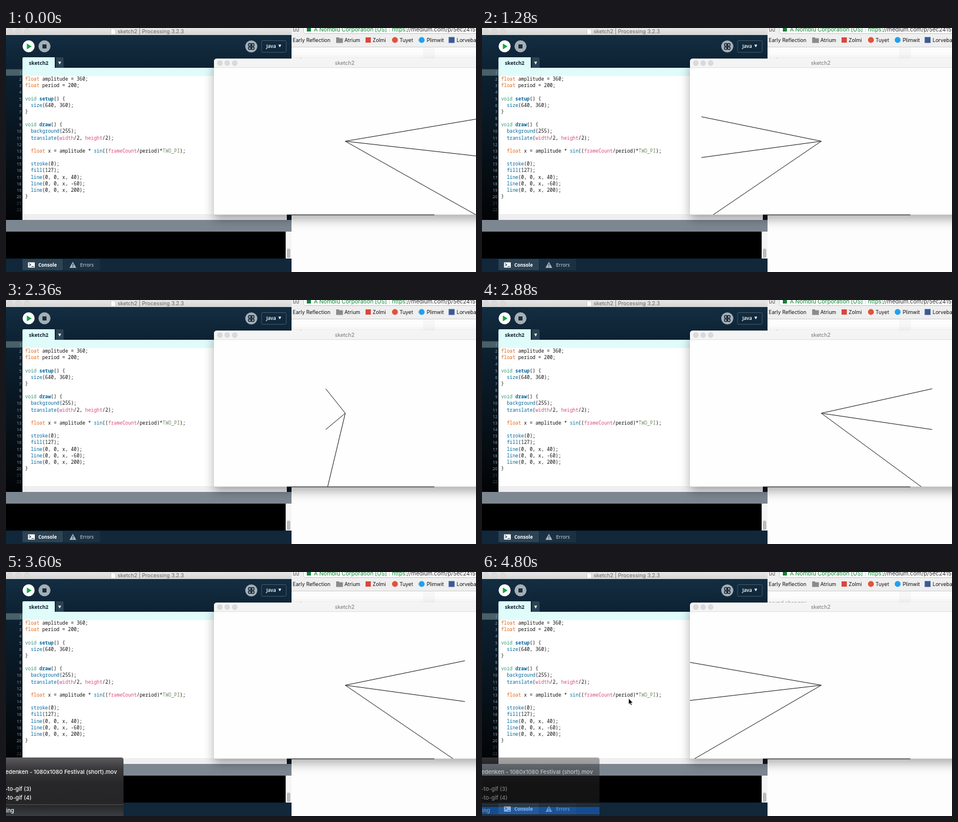
An HTML page for the animation above (4840 ms loop, 800x417 px).

```html
<!DOCTYPE html>
<html lang="en">
<head>
<meta charset="utf-8">
<title>sketch2</title>
<style>
  html, body { margin: 0; width: 100%; height: 100%; overflow: hidden; background: #fff; }
  svg { display: block; width: 100vw; height: 100vh; }
  text { font: 9px Inter, sans-serif; white-space: pre; }
  .ide { font: 600 8.3px "Open Sans", sans-serif; fill: #fff; }
  .num { font: 7.4px "Open Sans", sans-serif; text-anchor: end; fill: #93a4af; }
  .code text { font: 500 8.13px "Noto Sans Mono", monospace; fill: #111; }
  .type { fill: #e2661a; }
  .void { fill: #33997e; }
  .func, .main { fill: #069; }
  .main { font-weight: 700; }
  .sys { fill: #d94a7a; }
  .const { fill: #718a62; }
  .address text { font-size: 9.6px; }
  .bookmarks text { font-size: 8.7px; fill: #111; }
  .caption { fill: #777; }
  .lights { fill: #dadada; stroke: #c8c8c8; stroke-width: .6; }
  .menu text { font-size: 9.45px; font-weight: 500; fill: #fff; }
  #rays { stroke: #1c1c1c; }
</style>
</head>
<body>
<svg viewBox="0 0 800 417" preserveAspectRatio="none">
  <defs>
    <linearGradient id="bar" x2="0" y2="1"><stop stop-color="#e6e6e6"/><stop offset="1" stop-color="#d5d5d5"/></linearGradient>
    <linearGradient id="head" x2="0" y2="1"><stop stop-color="#132d41"/><stop offset="1" stop-color="#0d2233"/></linearGradient>
    <linearGradient id="gutter" x2="0" y2="1"><stop stop-color="#0d2233"/><stop offset="1" stop-color="#020406"/></linearGradient>
    <linearGradient id="glass" x2="0" y2="1"><stop stop-color="#5c5c5e"/><stop offset=".2" stop-color="#38383a"/><stop offset=".45" stop-color="#272729"/><stop offset=".8" stop-color="#252527"/><stop offset="1" stop-color="#3a3e43"/></linearGradient>
    <filter id="shadow" x="-20%" y="-20%" width="140%" height="150%"><feDropShadow dx="0" dy="8" stdDeviation="9" flood-opacity=".32"/></filter>
    <clipPath id="canvas"><path d="M354 68h446v251H354z"/></clipPath>
  </defs>

  <!-- browser -->
  <path fill="#fdfdfd" d="M486 0h314v417H486z"/>
  <path fill="#f7f7f7" d="M710 33h20v20h-20z"/>
  <path fill="#efefef" d="M486 0h314v32H486z"/>
  <path stroke="#d0d0d0" d="M486 32.500h314"/>
  <path fill="#fff" stroke="#c8c8c8" d="M506.500-5V6.500q0 3 3 3H805V-5z"/>
  <path fill="none" stroke="#777" d="M489.500 0v5.500h3V2h2.500v3.500h3V0"/>
  <g class="address">
    <path fill="#188038" d="M512 0h7v6h-7z"/>
    <text x="524" y="5.500" fill="#188038">A Nomblu Corporation [US]</text>
    <path stroke="#ccc" d="M652.500 0v7"/>
    <text x="657" y="5.500" fill="#333"><tspan fill="#188038">https</tspan>://medium.com/p/5ec2415</text>
  </g>
  <g class="bookmarks">
    <text x="488" y="23.500">Early Reflection</text>
    <path fill="#8a8a8a" d="M562 16h4.500l1 1.500h6v8H562z"/>
    <text x="576" y="23.500">Atrium</text>
    <path fill="#d9473c" d="M612 16h9v9h-9z"/>
    <text x="624" y="23.500">Zolmi</text>
    <circle cx="662" cy="20.500" r="5" fill="#e0523f"/>
    <text x="670" y="23.500">Tuyet</text>
    <circle cx="707.500" cy="20.500" r="5" fill="#1da1f2"/>
    <text x="716" y="23.500">Plimwit</text>
    <path fill="#3b5998" d="M753.500 15.500h10v10h-10z"/>
    <text x="767" y="23.500">Lorvebam</text>
  </g>
  <circle cx="502" cy="51.500" r=".6" fill="#999"/>
  <text id="status" x="488" y="56" fill="#999">saved changes</text>

  <!-- editor -->
  <path fill="#0d2233" d="M0 0h486v417H0z"/>
  <path fill="url(#bar)" d="M0 0h486v12H0z"/>
  <g class="lights"><circle cx="6.500" cy="5.500" r="4.300"/><circle cx="21" cy="5.500" r="4.300"/><circle cx="35.500" cy="5.500" r="4.300"/></g>
  <path fill="#fafafa" stroke="#bbb" stroke-width=".7" d="M178.500 1h5l3 3v7h-8z"/>
  <text x="190" y="9" fill="#666">sketch2 | Processing 3.2.3</text>
  <path fill="url(#head)" d="M0 12h486V70H0z"/>
  <circle cx="38.500" cy="31.300" r="10.200" fill="#fff"/>
  <path fill="#18a347" d="M35.500 26.500l8 5-8 5z"/>
  <circle cx="65.500" cy="31.300" r="10.200" fill="#a5afb6"/>
  <path fill="#1b3040" d="M62 28h7v7h-7z"/>
  <circle cx="417.500" cy="31.500" r="10.300" fill="#a5afb6"/>
  <g fill="none" stroke="#14293a" stroke-width="1.400">
    <circle cx="414.800" cy="28.700" r="2.200"/><circle cx="420.200" cy="28.700" r="2.200"/>
    <circle cx="414.800" cy="34.500" r="2.200"/><circle cx="420.200" cy="34.500" r="2.200"/><path d="M417.500 26v11"/>
  </g>
  <rect x="435" y="21.500" width="42" height="20" rx="2" fill="none" stroke="#40576a"/>
  <text class="ide" x="443" y="34">Java</text>
  <path fill="#fff" d="M463.500 28.500h5l-2.500 4.500z"/>
  <path fill="url(#gutter)" d="M0 70h28v258H0z"/>
  <path fill="#4a6069" d="M0 70.500h28v11H0z"/>
  <path fill="#fff" d="M28 70h458v248H28z"/>
  <path fill="#e0fcfa" d="M28 52q0-2 2-2h53v18h403v14H28z"/>
  <text class="ide" x="39" y="63" style="fill:#0d2233;font-weight:700;font-size:8.600px">sketch2</text>
  <path fill="#2b4354" d="M85 50h11q2 0 2 2v16H85z"/>
  <path fill="#fff" d="M88.800 57.500h5l-2.500 5z"/>
  <g id="numbers"></g>
  <g id="code" class="code"></g>
  <path fill="#efefef" d="M28 318h450v10H28z"/>
  <path fill="#0b1722" d="M478 318h8v10h-8z"/>
  <path fill="#7d8791" d="M0 328h486v20H0z"/>
  <path fill="#000" d="M0 348h476v46H0z"/>
  <path fill="#f5f5f5" d="M476 348h10v46h-10z"/>
  <rect x="478" y="377" width="6" height="16" rx="3" fill="#bcbcbc"/>
  <path fill="#11273a" d="M0 394h486v23H0z"/>
  <path fill="#2c4354" d="M28 395h69v19H28z"/>
  <path fill="#1a3143" d="M98 395h62v19H98z"/>
  <path fill="#fff" d="M37.500 400.500h11.500v9H37.500z"/>
  <path fill="none" stroke="#2c4354" stroke-width="1.200" d="M39.500 402.500l2.500 2-2.500 2M43.500 407.500h4"/>
  <text class="ide" x="55" y="408" style="font-size:8px;font-weight:700">Console</text>
  <path fill="#aab5bd" d="M113.800 399.500l5.800 10.500H108z"/>
  <path stroke="#1a3143" stroke-width="1.200" d="M113.800 402.800v3.700m0 1v1.300"/>
  <text class="ide" x="126" y="408" style="font-size:8px;fill:#aab5bd">Errors</text>

  <!-- sketch window -->
  <path filter="url(#shadow)" fill="#fefefe" d="M354 319V57.500q0-5 5-5h461V319z"/>
  <path fill="#f4f4f4" d="M354 68V57.500q0-5 5-5h441V68z"/>
  <path stroke="#d6d6d6" stroke-width=".7" d="M354 67.700h446"/>
  <g class="lights"><circle cx="364" cy="60" r="4.200"/><circle cx="376.500" cy="60" r="4.200"/><circle cx="389.300" cy="60" r="4.200"/></g>
  <text class="caption" x="576.500" y="63.200" text-anchor="middle">sketch2</text>
  <path stroke="#c4c4c4" stroke-width=".7" d="M354 319.200h446"/>
  <path stroke="#1c1c1c" d="M478 319.300h251"/>
  <g clip-path="url(#canvas)"><path id="rays" fill="none"/></g>

  <!-- pop-up menu -->
  <g id="menu" class="menu">
    <path fill="url(#glass)" d="M0 317h196q4 0 4 4v96H0z"/>
    <path stroke="#5c5c5d" stroke-width=".8" d="M0 397.500h200"/>
    <path id="pick" fill="#1a72e6" d="M0 401.500h200V414H0z"/>
    <text x="-1" y="344.700">edenken - 1080x1080 Festival (short).mov</text>
    <text x="-1.500" y="373.500">-to-gif (3)</text>
    <text x="-1.500" y="388.500">-to-gif (4)</text>
    <text x="0" y="411">ing</text>
  </g>
  <path id="pointer" fill="#000" stroke="#fff" stroke-width=".8" d="M249.500 216v10.500l2.400-2.200 1.700 3.800 1.800-.8-1.600-3.600h3.300z"/>
</svg>
<script>
const $ = id => document.getElementById(id);

const program = `
float amplitude = 360;
float period = 200;

void setup() {
  size(640, 360);
}

void draw() {
  background(255);
  translate(width/2, height/2);

  float x = amplitude * sin((frameCount/period)*TWO_PI);

  stroke(0);
  fill(127);
  line(0, 0, x, 40);
  line(0, 0, x, -60);
  line(0, 0, x, 200);
}`.split("\n");

const words = {
  type: "float", void: "void", main: "setup|draw",
  func: "size|background|translate|sin|stroke|fill|line",
  sys: "width|height|frameCount", const: "TWO_PI"
};
const lineY = i => 79 + i * 11.16;
const paint = src => src.replace(/\w+/g, word => {
  const kind = Object.keys(words).find(k => words[k].split("|").includes(word));
  return kind ? `<tspan class="${kind}">${word}</tspan>` : word;
});

$("code").innerHTML = program.map((src, i) => {
  const body = src.trimStart();
  const x = 32.4 + (src.length - body.length) * 4.88;
  return `<text x="${x}" y="${lineY(i)}">${paint(body)}</text>`;
}).join("");

$("numbers").innerHTML = Array.from({ length: 22 }, (_, i) =>
  `<text class="num" x="26.500" y="${lineY(i)}"${i > 19 ? ' opacity=".45"' : ""}>${i + 1}</text>`
).join("");

const LOOP = 4840, STEP = 40;
const SCALE = 251 / 360, CX = 577.5, CY = 193.5;

const knots = [[0, 101], [1280, 234.4], [1880, 300.3], [2880, 408.8],
               [3600, 485.8], [4360, 561.8], [4800, 612.5], [LOOP, 617]];

function phase(t) {
  const i = knots.findIndex(k => k[0] > t);
  const [t0, a] = knots[i - 1], [t1, b] = knots[i];
  return a + (b - a) * (t - t0) / (t1 - t0);
}

const show = (id, on) => { $(id).style.display = on ? "" : "none"; };

function draw(now) {
  const t = Math.floor(now % LOOP / STEP) * STEP;
  const x = CX + 360 * SCALE * Math.sin(phase(t) * Math.PI / 180);
  $("rays").setAttribute("d", [40, -60, 200]
    .map(y => `M${CX} ${CY}L${x.toFixed(2)} ${(CY + y * SCALE).toFixed(2)}`).join(""));

  show("menu", t >= 3200);
  show("pick", t >= 4080);
  show("status", t >= 4000);
  show("pointer", t >= 4800);
  $("menu").setAttribute("opacity", Math.min(1, (4900 - t) / 200));
}

function tick() {
  draw(performance.now());
  requestAnimationFrame(tick);
}
tick();
</script>
</body>
</html>
```
